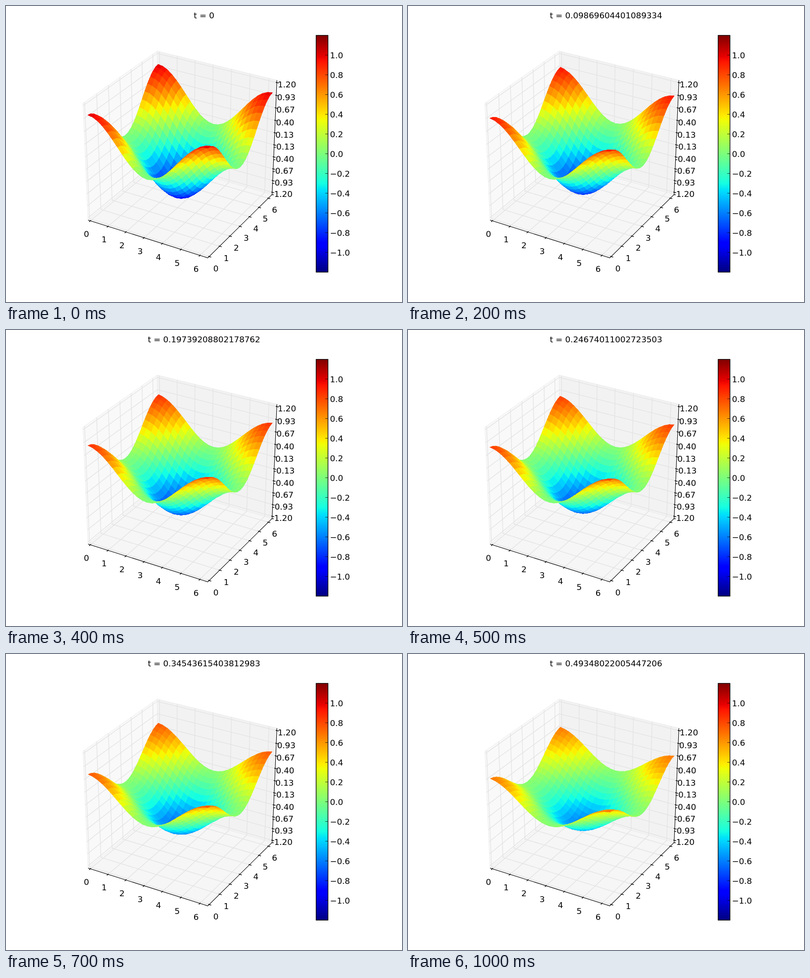
These frames come from a looping animation (800x600 px, 1100 ms). An HTML page:

```html
<!DOCTYPE html>
<html lang="en">
<head>
<meta charset="utf-8">
<title>Diffusing surface</title>
<style>
  html, body { margin: 0; width: 100%; height: 100%; overflow: hidden; background: #fff; }
  svg { display: block; width: 800px; height: 600px; }
  text { font: 16.67px "DejaVu Sans", sans-serif; fill: #000; }
</style>
</head>
<body>
<svg id="stage" viewBox="0 0 800 600"></svg>
<script>
const svg = document.getElementById('stage');
const FRAME_MS = 100, FRAMES = 11;
const CELLS = 24, STEPS = 72, RATE = 0.01, Z_MAX = 1.2;
const TAU = 2 * Math.PI;
const E = 25 / 48;             // half size of the padded box around the unit cube
const LABEL = 0.577;           // distance of the tick labels from the centre

function add(parent, tag, attrs, content) {
  const node = document.createElementNS('http://www.w3.org/2000/svg', tag);
  for (const key in attrs) node.setAttribute(key, attrs[key]);
  if (content !== undefined) node.textContent = content;
  parent.appendChild(node);
  return node;
}

// Perspective camera: azimuth -60 deg, elevation 30 deg, distance 10.
const C = Math.sqrt(3) / 2;
const depth = ([x, y, z]) => C / 2 * x - 0.75 * y + 0.5 * z;
function project(p) {
  const [x, y, z] = p, w = 10 - depth(p);
  return [
    354.7 + 2681 * (C * x + 0.5 * y) / w,
    293.5 - 2594.6 * (-0.25 * x + C / 2 * y + C * z) / w
  ];
}
const points = list => list.map(p => project(p).map(v => v.toFixed(2)).join()).join(' ');
const path = (list, color, width) =>
  add(svg, 'polyline', { points: points(list), fill: 'none', stroke: color, 'stroke-width': width });

const clamp = v => Math.max(0, Math.min(1, v));
function jet(v) {
  const r = v < 0.89 ? (v - 0.35) / 0.31 : 1 - (v - 0.89) / 0.22;
  const g = v < 0.5 ? (v - 0.125) / 0.25 : (0.91 - v) / 0.27;
  const b = v < 0.2 ? 0.5 + v / 0.22 : (0.65 - v) / 0.31;
  return `rgb(${[r, g, b].map(c => Math.round(255 * clamp(c))).join()})`;
}

function label(x, y, content, anchor = 'middle') {
  return add(svg, 'text', { x, y, 'text-anchor': anchor }, content);
}
function labelAt(p, drop, content) {
  const [x, y] = project(p);
  label(x, Math.round(y + drop), content);
}

const ticksXY = [0, 1, 2, 3, 4, 5, 6].map(n => ({ at: n / TAU - 0.5, name: String(n) }));
const ticksZ = Array.from({ length: 10 }, (_, i) => {
  const z = -Z_MAX + i * 2 * Z_MAX / 9;
  return { at: z / (2 * Z_MAX), name: z.toFixed(2) };
});

function drawBox() {
  const pane = (fill, list) =>
    add(svg, 'polygon', { points: points(list), fill, stroke: '#ececec', 'stroke-width': 1 });
  pane('#f9f9f9', [[-E, -E, -E], [-E, E, -E], [-E, E, E], [-E, -E, E]]);
  pane('#f2f2f2', [[-E, E, -E], [E, E, -E], [E, E, E], [-E, E, E]]);
  pane('#f6f6f6', [[-E, -E, -E], [E, -E, -E], [E, E, -E], [-E, E, -E]]);

  const grid = list => path(list, '#e3e3e3', 1.3);
  for (const { at } of ticksXY) {
    grid([[at, -E, -E], [at, E, -E], [at, E, E]]);
    grid([[E, at, -E], [-E, at, -E], [-E, at, E]]);
  }
  for (const { at } of ticksZ) grid([[-E, -E, at], [-E, E, at], [E, E, at]]);
}

function drawAxes() {
  path([[-E, -E, -E], [E, -E, -E], [E, E, -E], [E, E, E]], '#000', 1.05);
  const out = E + 0.2 / 12, inn = E - 0.1 / 12;
  const tick = (a, b) => path([a, b], '#000', 1.3);
  for (const { at, name } of ticksXY) {
    tick([at, -out, -E], [at, -inn, -E]);
    tick([out, at, -E], [inn, at, -E]);
    labelAt([at, -LABEL, -LABEL], 13.5, name);
    labelAt([LABEL, at, -LABEL], 13.5, name);
  }
  for (const { at, name } of ticksZ) {
    tick([out, E, at], [inn, E, at]);
    labelAt([LABEL, LABEL, at], 12.3, name);
  }
}

function drawColorbar() {
  const ramp = add(add(svg, 'defs', {}), 'linearGradient', { id: 'ramp', x1: 0, y1: 1, x2: 0, y2: 0 });
  for (const v of [0, 0.11, 0.125, 0.34, 0.35, 0.375, 0.64, 0.65, 0.66, 0.89, 0.91, 1])
    add(ramp, 'stop', { offset: v, 'stop-color': jet(v) });
  add(svg, 'rect', { x: 626.5, y: 59.5, width: 24, height: 480,
    fill: 'url(#ramp)', stroke: '#000', 'stroke-width': 1.3 });
  for (let i = -5; i <= 5; i++) {
    const y = 299.5 - 40 * i;
    add(svg, 'path', { d: `M645 ${y}H650.5`, stroke: '#000', 'stroke-width': 0.7 });
    label(654.5, y + 6.5, (i < 0 ? '\u2212' : '') + Math.abs(i / 5).toFixed(1), 'start');
  }
}

// Heat equation along one axis with insulated ends;
// the surface is the mean of two such profiles.
function buildProfiles() {
  let u = Array.from({ length: CELLS + 1 }, (_, i) => Math.cos(i * TAU / CELLS));
  const step = () => u.map((v, i) => {
    const before = u[Math.max(0, i - 1)], after = u[Math.min(CELLS, i + 1)];
    return v + RATE * (before - 2 * v + after);
  });
  const list = [u];
  while (list.length < FRAMES) {
    for (let n = 0; n < STEPS; n++) u = step();
    list.push(u);
  }
  return list;
}

function buildTimes() {
  const a = 0.19739208802178762, b = 0.2960881320326824, c = 0.39478417604357724;
  const gain = (c - b) / 2;
  return [0, 0.049348022005446794, 0.09869604401089334, a - gain, a, a + gain,
    b, b + gain, c, c + gain, 0.49348022005447206];
}

const profiles = buildProfiles();
const times = buildTimes();

drawBox();
drawAxes();
const surface = add(svg, 'g', { 'shape-rendering': 'crispEdges', 'stroke-width': 0.5 });
const facets = Array.from({ length: CELLS * CELLS }, () => add(surface, 'polygon', {}));
drawColorbar();
const title = label(400, 25, '');

function draw(frame) {
  const u = profiles[frame], quads = [];
  const vertex = (i, j) =>
    [i / CELLS - 0.5, j / CELLS - 0.5, (u[i] + u[j]) / 2 / (2 * Z_MAX)];
  for (let i = 0; i < CELLS; i++) {
    for (let j = 0; j < CELLS; j++) {
      const corners = [vertex(i, j), vertex(i + 1, j), vertex(i + 1, j + 1), vertex(i, j + 1)];
      const mean = f => corners.reduce((sum, p) => sum + f(p), 0) / 4;
      quads.push({ corners, near: mean(depth), color: jet(0.5 + mean(p => p[2])) });
    }
  }
  quads.sort((p, q) => p.near - q.near);
  quads.forEach(({ corners, color }, k) => {
    facets[k].setAttribute('points', points(corners));
    facets[k].setAttribute('fill', color);
    facets[k].setAttribute('stroke', color);
  });
  title.textContent = 't = ' + times[frame];
}

let shown = -1;
const start = performance.now();
function tick() {
  const elapsed = Math.max(0, performance.now() - start);
  const frame = Math.floor(elapsed / FRAME_MS) % FRAMES;
  if (frame !== shown) draw(shown = frame);
  requestAnimationFrame(tick);
}
tick();
</script>
</body>
</html>
```
